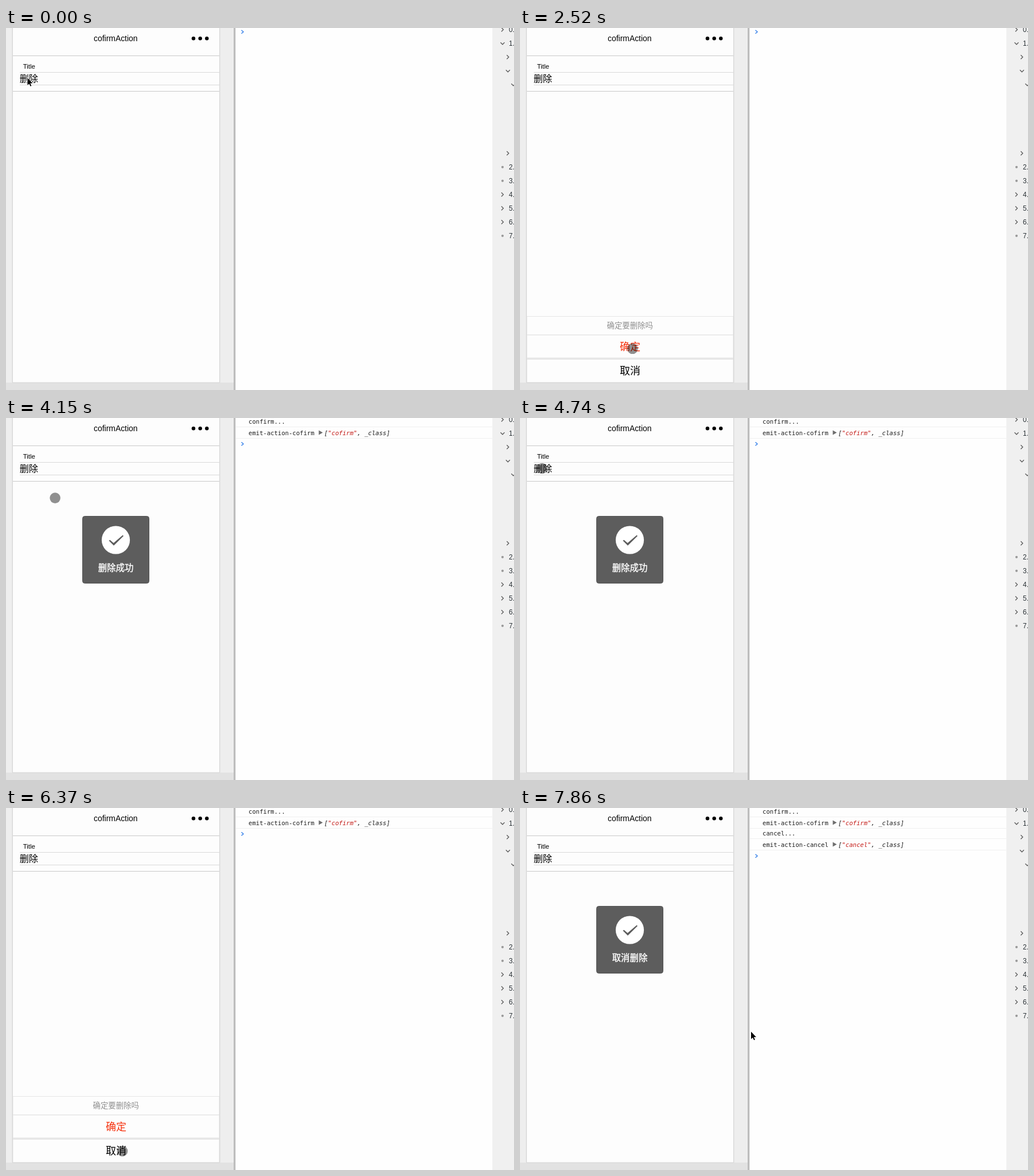
An HTML page that plays this animation: 886 px wide and 632 px high, repeating every 8 s.

```html
<!DOCTYPE html>
<html lang="zh-CN">
<head>
<meta charset="utf-8">
<title>cofirmAction</title>
<style>
  html, body { margin: 0; width: 100%; height: 100%; overflow: hidden; }
  svg { display: block; width: 886px; height: 632px; }
  text { font-family: "Liberation Sans", "Noto Sans CJK SC", "Noto Sans CJK", sans-serif; white-space: pre; }
  .mid { text-anchor: middle; }
  .big { font-size: 18px; }
  .log text { font: 10.6px "DejaVu Sans Mono", monospace; fill: #1c1c1c; }
  .log .array { font-style: italic; }
  .log .string { fill: #c41a16; }
  .log path { fill: #6e6e6e; }
  .log line { stroke: #f0f0f0; }
  .tree text { font-size: 12px; fill: #2c3338; }
  .tree path { fill: none; stroke: #5a5a5a; stroke-width: 1.3; }
  .tree circle { fill: #999; }
</style>
</head>
<body>
<svg viewBox="0 0 886 632">
  <rect width="886" height="632" fill="#eee"/>
  <rect y="619" width="397" height="13" fill="#e2e2e2"/>
  <rect x="10.5" y="-5" width="363" height="625" rx="2" fill="#d9d9d9"/>
  <rect x="12" width="360" height="618.5" fill="#fdfdfd"/>
  <rect x="397" width="3.5" height="632" fill="#bdbdbd"/>
  <rect x="400.5" width="448" height="632" fill="#fefefe"/>
  <rect x="848.5" width="38" height="632" fill="#f0f0f0"/>

  <text class="mid" x="191.3" y="23" font-size="13.9">cofirmAction</text>
  <circle cx="327" cy="18.3" r="3.2"/><circle cx="338.7" cy="18.3" r="3.2"/><circle cx="350.3" cy="18.3" r="3.2"/>
  <path d="M12 48.5H372M12 110.5H372" stroke="#c9c9c9"/>
  <path d="M24 77.5H372M24 99.5H372" stroke="#d9d9d9"/>
  <text x="29.7" y="71" font-size="11.5">Title</text>
  <text x="23.7" y="94.4" font-size="16.2">删除</text>

  <g id="sheet">
    <rect x="12" y="503" width="360" height="116" fill="#e6e6e6"/>
    <path d="M12.5 504H371.5V535H12.5ZM12.5 536.5H371.5V575.5H12.5ZM12.5 579H371.5V618H12.5Z" fill="#fdfdfd"/>
    <text class="mid" x="191.7" y="524.4" font-size="13.4" fill="#8f8f8f">确定要删除吗</text>
    <text class="mid big" x="192" y="563" fill="#f5300c">确定</text>
    <text class="mid big" x="192" y="605">取消</text>
    <rect id="tap" x="11.5" y="535.5" width="361" height="41" rx="2" fill="#33b5e5" fill-opacity=".4" stroke="#33b5e5" stroke-opacity=".25"/>
  </g>

  <g id="toast">
    <rect x="133.5" y="171.5" width="116" height="117" rx="4" fill="#5d5d5d" stroke="#535353"/>
    <circle cx="191.5" cy="213" r="24.6" fill="#fff"/>
    <path d="M179.5 214.2L181.2 212.8L187.6 218.2L203.6 204.6L205 206L188 222.8Z" fill="#5d5d5d"/>
    <text id="message" class="mid" x="191.5" y="267.2" font-size="15.4" fill="#fff" stroke="#fff" stroke-width=".4"></text>
  </g>

  <g class="log" id="log"></g>
  <path id="prompt" d="M410.5 -3L414 0L410.5 3" fill="none" stroke="#3b84ea" stroke-width="1.5"/>
  <g class="tree" id="tree"></g>

  <circle id="touch" r="9.3"/>
  <path id="arrow" d="M.5 1V14L3.4 11.2L5.6 15.8L7.4 15L5.3 10.4H9.4Z" stroke="#fff" stroke-width="1.6" paint-order="stroke"/>
</svg>
<script>
const $ = id => document.getElementById(id);
const show = (id, on) => $(id).setAttribute('visibility', on ? 'inherit' : 'hidden');
const move = (id, x, y) => $(id).setAttribute('transform', `translate(${x} ${y})`);

// Console: each action prints a message row and an event row
const logGroup = (id, y, message, name) => `<g id="${id}">
  <text x="423" y="${y + 10}">${message}...</text><line x1="401" x2="848" y1="${y + 15.5}" y2="${y + 15.5}"/>
  <text x="423" y="${y + 30}">emit-action-${name}</text><path d="M545.5 ${y + 21.5}V${y + 29.5}L552.5 ${y + 25.5}Z"/>
  <text class="array" x="555" y="${y + 30}">[<tspan class="string">"${name}"</tspan>, _class]</text>
  <line x1="401" x2="848" y1="${y + 35.5}" y2="${y + 35.5}"/></g>`;
$('log').innerHTML = logGroup('confirmLog', 0, 'confirm', 'cofirm') + logGroup('cancelLog', 38, 'cancel', 'cancel');

// Sidebar outline: one marker and one indent digit per row; top-level rows are numbered
const marks = {
  '>': '<path d="M-2 -3.5l3.5 3.5l-3.5 3.5"/>',
  'v': '<path d="M-3.5 -1.5l3.5 3.5l3.5 -3.5"/>',
  '.': '<circle r="2.1"/>'
};
const markers = '>v>vv    >..>>>.', indents = '0011200001000000';
let chapter = 0;
$('tree').innerHTML = [...markers].map((mark, row) => {
  if (mark === ' ') return '';
  const indent = +indents[row];
  const label = indent ? '' : `<text x="11" y="4.3">${chapter++}.</text>`;
  return `<g transform="translate(${866 + 9.4 * indent} ${2.8 + 24 * row})">${marks[mark]}${label}</g>`;
}).join('');

// Pointer trips: a few discrete steps that slow down; the two powers bend the path
const STEP = 146;
const home = [38.5, 88];
const trips = [
  { at: 1800, steps: 6, to: [197, 562], power: [3, 3] },
  { at: 3710, steps: 8, to: home, power: [1.75, 3.2] },
  { at: 5490, steps: 7, to: [203, 599], power: [7, 7] },
  { at: 7120, steps: 3, to: [125, 263], power: [2, 2] },
  { at: 7710, steps: 2, to: [402.5, 389.5], power: [1, 1] }
];

function pointerAt(t) {
  let position = home;
  for (const { at, steps, to, power } of trips) {
    if (t < at) break;
    const left = Math.max(0, 1 - (Math.floor((t - at) / STEP) + 1) / steps);
    position = position.map((from, i) => to[i] + (from - to[i]) * left ** power[i]);
  }
  return position;
}

function draw(t) {
  const within = (from, to) => t >= from && t < to;
  const [x, y] = pointerAt(t);
  const hovering = t < 750;
  const isArrow = hovering || x > 373;
  const tapped = within(3270, 3410);
  const confirmed = t >= 3410, cancelled = t >= 6820;

  show('arrow', isArrow);
  show('touch', !isArrow);
  move('arrow', hovering ? 37 : x, hovering ? 86 : y);
  move('touch', x, y);
  $('touch').setAttribute('fill-opacity', tapped ? .62 : .43);

  show('sheet', within(1350, 3410) || within(5040, 6820));
  show('tap', tapped);

  show('toast', within(3270, 6370) || cancelled);
  $('toast').setAttribute('opacity', within(6230, 6370) ? .55 : 1);
  $('message').textContent = cancelled ? '取消删除' : '删除成功';

  show('confirmLog', confirmed);
  show('cancelLog', cancelled);
  move('prompt', 0, 6.8 + 38.5 * (confirmed + cancelled));
}

const start = performance.now();
function frame() {
  draw((performance.now() - start) % 8000);
  requestAnimationFrame(frame);
}
frame();
</script>
</body>
</html>
```
